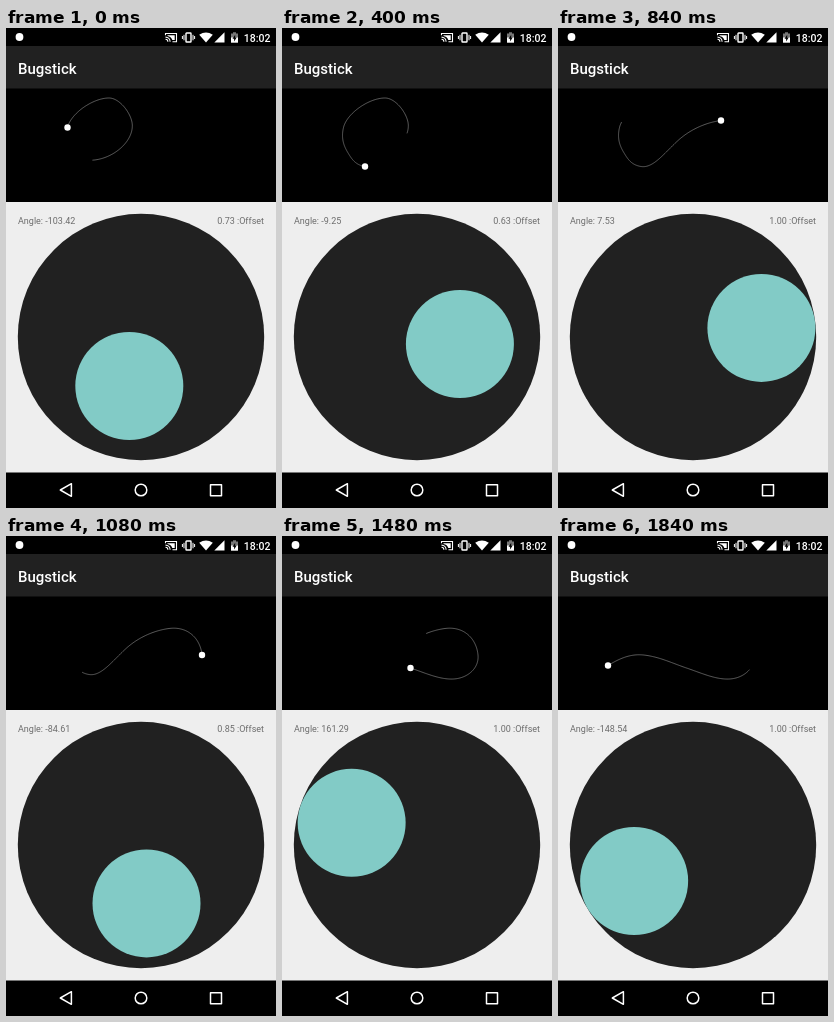
An HTML page that plays this animation: 270 by 480 pixels, repeating every 1.88 s.

```html
<!DOCTYPE html>
<html lang="en">
<head>
<meta charset="utf-8">
<title>Bugstick</title>
<style>
  html, body { margin: 0; width: 100%; height: 100%; overflow: hidden; background: #000; }
  svg { display: block; width: 270px; height: 480px; }
  text { font-family: Roboto, Arial, sans-serif; }
  .label { font-size: 9px; fill: #6c6c6c; }
  .strong { font-weight: 500; fill: #fff; }
  .line { fill: none; stroke: #fff; }
</style>
</head>
<body>
<svg viewBox="0 0 270 480">
  <rect width="270" height="480"/>
  <rect y="18" width="270" height="42.5" fill="#212121"/>
  <rect y="174" width="270" height="270.5" fill="#eee"/>

  <!-- status bar -->
  <g fill="#fff" transform="translate(0 .3)">
    <circle cx="13.5" cy="8.7" r="3.9"/>
    <path class="line" stroke-width="1.1" d="M159.5 7V5.2h11v8.2h-4M159.5 8.8a4.6 4.6 0 0 1 4.6 4.6M159.5 11a2.4 2.4 0 0 1 2.4 2.4"/>
    <path d="M161.5 7h7.2v4.8h-2.4a6 6 0 0 0-4.8-4z"/>
    <rect class="line" x="180" y="4.7" width="5" height="9" rx=".6" stroke-width="1.4"/>
    <path class="line" stroke-width="1" d="M178 6.5v5.5M176.4 7.7v3M187 6.5v5.5M188.6 7.7v3"/>
    <path d="M193.2 6.4Q200 1.8 206.8 6.4L200 14.3z"/>
    <path d="M218.5 4v10.2h-10.2z"/>
    <path fill="#777" d="M225 5.2h2V4h3v1.2h2V9h-7z"/>
    <path d="M225 9h7v5.4h-7z"/>
    <path fill="#000" d="M229.2 6.5l-2.7 4h1.6v2.7l2.6-4h-1.5z"/>
  </g>
  <text class="strong" x="264.5" y="13.6" font-size="10.5" text-anchor="end">18:02</text>
  <text class="strong" x="12" y="45.5" font-size="15">Bugstick</text>

  <!-- bug and its trail -->
  <path id="trail" fill="none" stroke="#777" stroke-width=".8"/>
  <circle id="bug" r="3.2" fill="#fff"/>

  <!-- joystick -->
  <circle cx="135" cy="309" r="123.2" fill="#212121"/>
  <circle id="knob" r="54" fill="#82cbc6"/>
  <text id="angle" class="label" x="12" y="196"></text>
  <text id="offset" class="label" x="258" y="196" text-anchor="end"></text>

  <!-- navigation bar -->
  <g class="line" stroke-width="1.5" stroke-linejoin="round">
    <path d="M54.3 462L65.4 455.7V468.3z"/>
    <circle cx="135" cy="462" r="5.8"/>
    <rect x="204.5" y="456.7" width="11" height="11"/>
  </g>
</svg>
<script>
const LOOP = 1880, STEP = 40;
const SPEED = .24;    // bug's px per ms at full offset
const TRAIL = 149.5;  // trail length
const REACH = 69;     // knob travel

// Turning points of the ride: the stick steers the bug, so its pose gives the bug's velocity
const keys = [
  [-690, 86, 132.2, 3, .95],
  [-420, 126.3, 97, 92, .8],
  [-250, 103, 70, 180, .8],
  [0, 61.5, 99.5, -103.42, .73],
  [220, 67, 126.5, -58, .44],
  [400, 83, 138.5, -9.25, .63],
  [640, 119.5, 113, 42.86, 1],
  [840, 163, 92.5, 7.53, 1],
  [1080, 196, 119, -84.61, .85],
  [1280, 171.5, 143, -177, .86],
  [1480, 128.5, 132, 161.29, 1],
  [1675, 85.5, 119, 174, 1],
  [1840, 50, 129.5, -148.54, 1]
].map(([t, x, y, angle, offset]) => {
  const turn = angle * Math.PI / 180, v = SPEED * offset;
  return { t, pos: [x, y], vel: [v * Math.cos(turn), -v * Math.sin(turn)] };
});

// Cubic Hermite ride: the bug's place and velocity at time t
function ride(t) {
  const next = keys.findIndex(k => k.t >= t && k.t > keys[0].t);
  const a = keys[next - 1], b = keys[next];
  const span = b.t - a.t, u = (t - a.t) / span, w = 1 - u;
  const mix = f => [0, 1].map(i => f(a.pos[i], b.pos[i], a.vel[i], b.vel[i]));
  return {
    pos: mix((p, q, m, n) =>
      w * w * ((1 + 2 * u) * p + u * span * m) + u * u * ((1 + 2 * w) * q - w * span * n)),
    vel: mix((p, q, m, n) =>
      6 * u * w * (q - p) / span + w * (1 - 3 * u) * m + u * (1 - 3 * w) * n)
  };
}

function trailTo(t) {
  let last = ride(t).pos, d = "M" + last;
  for (let left = TRAIL; left > 0 && t - 4 > keys[0].t;) {
    const p = ride(t -= 4).pos;
    left -= Math.hypot(p[0] - last[0], p[1] - last[1]);
    d += "L" + p;
    last = p;
  }
  return d;
}

const el = id => document.getElementById(id);
function place(id, x, y) {
  el(id).setAttribute("cx", x);
  el(id).setAttribute("cy", y);
}

function draw(t) {
  const { pos, vel: [vx, vy] } = ride(t);
  const turn = Math.atan2(-vy, vx);
  const offset = Math.min(1, Math.hypot(vx, vy) / SPEED);

  place("bug", ...pos);
  el("trail").setAttribute("d", trailTo(t));
  place("knob", 135 + REACH * offset * Math.cos(turn), 309 - REACH * offset * Math.sin(turn));
  el("angle").textContent = `Angle: ${(turn * 180 / Math.PI).toFixed(2)}`;
  el("offset").textContent = `${offset.toFixed(2)} :Offset`;
}

const start = performance.now();
function tick(now) {
  const t = Math.max(0, now - start) % LOOP;
  draw(Math.floor(t / STEP) * STEP);
  requestAnimationFrame(tick);
}
draw(0);
requestAnimationFrame(tick);
</script>
</body>
</html>
```
